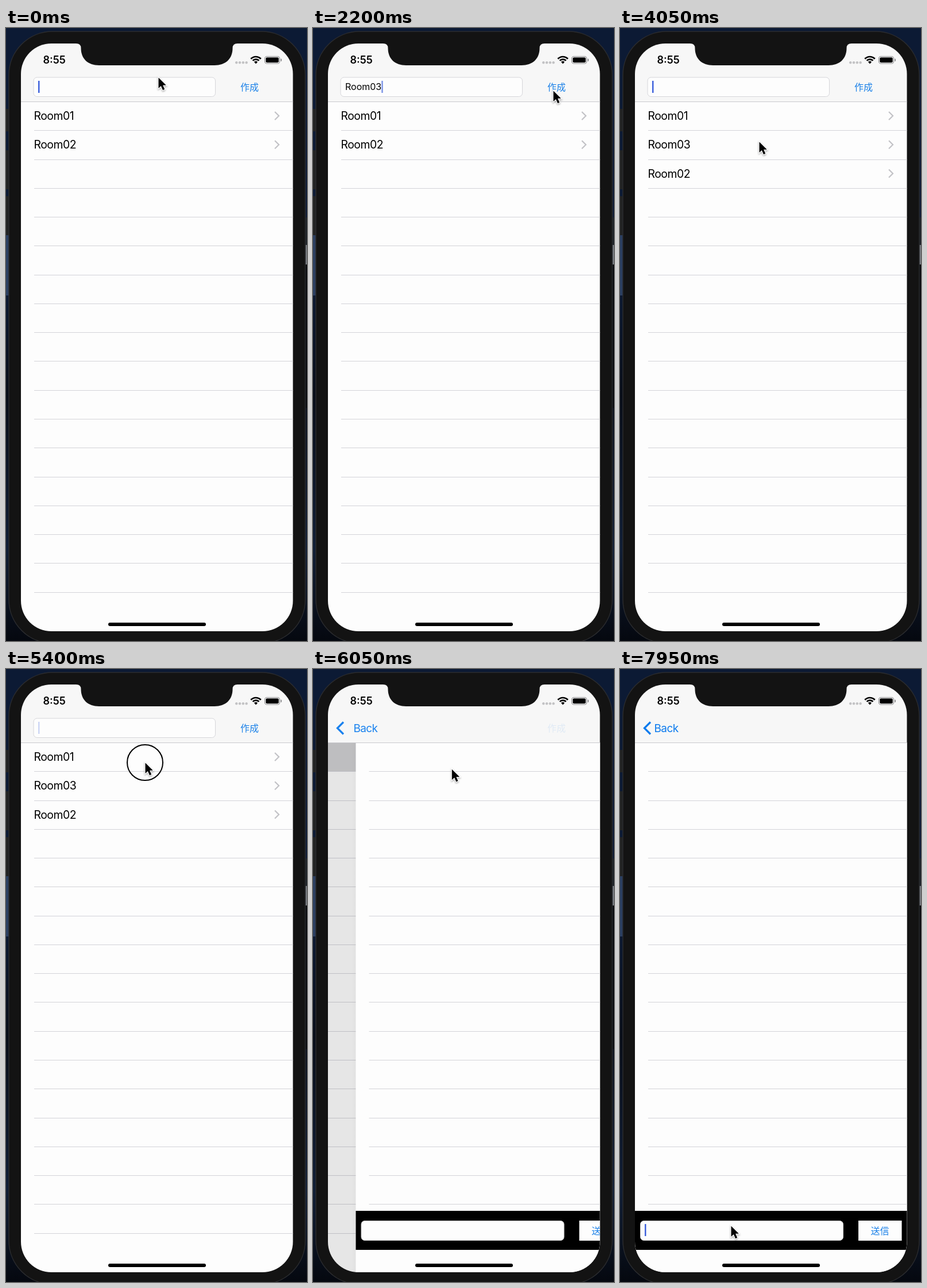
Write an HTML page with a canvas that moves like this. It is 524 px wide and 1068 px high and loops after 8 s.

```html
<!DOCTYPE html>
<html lang="ja">
<head>
<meta charset="utf-8">
<title>Rooms</title>
<style>
html, body { margin: 0; width: 100%; height: 100%; overflow: hidden; background: #0b1528; }
canvas { display: block; width: 524px; height: 1068px; }
</style>
</head>
<body>
<canvas id="stage" width="524" height="1068"></canvas>
<script>
const c = document.getElementById('stage').getContext('2d');
const LOOP = 8000, STEP = 50, ROW = 50.27, TOP = 128;
const LEFT = 26, RIGHT = 499.5, WIDTH = 474;
const PAPER = '#fdfdfd', BLUE = '#1a80e8', LINE = '#d3d3d8';
const LATIN = 'Inter, "Noto Sans", sans-serif';
const CJK = '"Noto Sans CJK JP", "Noto Sans CJK", sans-serif';

const NAME = 'Room03', TYPE_START = 650, TYPE_GAP = 200;
const CREATED = 2600, SELECTED = 5550, PUSH = 5856, FOCUS = 7500;
const CLICKS = [[2400, 2550], [5350, 5500], [7400, 7550]];
// Pointer stops: time, x, y
const PATH = [
  [0, 265, 86], [1500, 265, 86], [2150, 418, 109], [2750, 418, 109],
  [3750, 242, 198], [4500, 242, 198], [5200, 242, 163],
  [5960, 242, 163], [7250, 193, 970], [8000, 193, 970]
];

const clamp = v => Math.max(0, Math.min(1, v));
const smooth = v => v * v * (3 - 2 * v);

function rect(x, y, w, h, color) {
  c.fillStyle = color;
  c.fillRect(x, y, w, h);
}

function round(x, y, w, h, r, fill, stroke, width = 1) {
  c.beginPath();
  c.roundRect(x, y, w, h, r);
  if (fill) { c.fillStyle = fill; c.fill(); }
  if (stroke) { c.strokeStyle = stroke; c.lineWidth = width; c.stroke(); }
}

function poly(points, color, width) {
  c.beginPath();
  points.forEach(([x, y]) => c.lineTo(x, y));
  c.strokeStyle = color;
  c.lineWidth = width;
  c.stroke();
}

function text(s, x, y, font, color = '#000', spacing = 0) {
  c.font = font;
  c.letterSpacing = spacing + 'px';
  c.fillStyle = color;
  c.fillText(s, x, y);
}

function faded(alpha, draw) {
  c.save();
  c.globalAlpha *= clamp(alpha);
  draw();
  c.restore();
}

function backdrop() {
  const g = c.createLinearGradient(0, 0, 0, 1068);
  g.addColorStop(0, '#0c1a34');
  g.addColorStop(0.42, '#0c1a34');
  g.addColorStop(0.6, '#080d18');
  g.addColorStop(0.85, '#101e36');
  g.addColorStop(1, '#05080f');
  rect(0, 0, 524, 1068, g);
  [[141, 39], [213, 68], [293, 68]].forEach(([y, h]) => rect(0, y, 8, h, '#222323'));
  rect(0, 361, 8, 105, '#2b3f61');
  rect(518, 330, 6, 48, '#1b2026');
  rect(518, 378, 6, 34, '#777b80');
  rect(518, 412, 6, 250, '#05070b');
  round(5, 6, 516, 1066, 76, '#131313', '#2b2c2f', 1.5);
}

function separators(x, count) {
  for (let i = 1; i <= count; i++) rect(x, Math.round(TOP + ROW * i), 600, 1, LINE);
}

function roomList(t, p) {
  const shift = -0.3 * WIDTH * p;
  rect(LEFT, TOP, WIDTH, 930, PAPER);
  if (t >= SELECTED) rect(LEFT, TOP, WIDTH, ROW, '#d1d1d3');
  separators(49 + shift, 17);
  const rooms = t < CREATED ? ['Room01', 'Room02'] : ['Room01', NAME, 'Room02'];
  rooms.forEach((room, i) => {
    const y = 153 + ROW * i;
    text(room, 48.5 + shift, y + 7, '19.4px ' + LATIN, '#000', -0.5);
    poly([[468 + shift, y - 7], [475 + shift, y], [468 + shift, y + 7]], '#c3c3c7', 2.2);
  });
  rect(LEFT, TOP, WIDTH, 930, `rgba(0,0,0,${0.1 * p})`);
}

function chat(t, p) {
  const x = LEFT + WIDTH * (1 - p);
  if (p < 0.99) {
    const g = c.createLinearGradient(x - 9, 0, x, 0);
    g.addColorStop(0, 'rgba(0,0,0,0)');
    g.addColorStop(1, `rgba(0,0,0,${0.2 * (1 - p)})`);
    rect(x - 9, TOP, 9, 930, g);
  }
  rect(x, TOP, WIDTH, 930, PAPER);
  separators(x + 23, 16);
  rect(x, 944, WIDTH, 68, '#000');
  round(x + 9.5, 961.5, 353, 34, 6, PAPER, '#d0d0d0');
  rect(x + 389, 961, 75.5, 35, PAPER);
  text('送信', x + 410.5, 985, '16px ' + CJK, BLUE);
  if (t >= FOCUS) caret(44, 967, t - FOCUS);
}

function caret(x, y, age) {
  const k = age % 1000;
  const alpha = k < 750 ? 1 - (k - 500) / 150 : (k - 750) / 200;
  faded(alpha, () => rect(x - 1, y, 2.5, 21, '#3e62dc'));
}

function nav(t, p) {
  rect(LEFT, 27, WIDTH, 101, '#f7f7f7');
  rect(LEFT, TOP, WIDTH, 1, '#c9c9cd');
  const pushing = t >= PUSH;
  const x = pushing ? 121 - 150 * p : 48;
  faded(pushing ? 1 - p * 1.1 : 1, () => {
    round(x, 86, 316.5, 33.5, 6, PAPER, '#d6d6da');
    if (!pushing) {
      const typed = t < CREATED ? clamp((t - TYPE_START) / TYPE_GAP / 6 + 1 / 6) : 0;
      const count = t < TYPE_START ? 0 : Math.floor(typed * 6 + 0.001);
      const word = NAME.slice(0, count);
      text(word, 56, 108, '16px ' + LATIN);
      const last = TYPE_START + TYPE_GAP * (count - 1);
      caret(57 + c.measureText(word).width, 92, t >= CREATED ? t - CREATED : count ? t - last : t);
    }
  });
  faded(1 - p, () => text('作成', 408, 109, '16px ' + CJK, BLUE));
  faded(p * 1.05, () => {
    poly([[53, 92.5], [42.5, 103], [53, 113.5]], '#0d7bee', 3.3);
    text('Back', 59.5 + 107 * (1 - p), 110, '19px ' + LATIN, '#0d7bee', -0.6);
  });
}

function statusBar() {
  text('8:55', 64.5, 62, '600 18px ' + LATIN);
  for (let i = 0; i < 4; i++) round(399 + 5.8 * i, 58, 4.4, 4.4, 2.2, '#c2c2c4');
  c.strokeStyle = '#000';
  [[12, 2.7], [7.4, 2.7]].forEach(([r, w]) => {
    c.beginPath();
    c.arc(435, 62, r, -Math.PI * 0.76, -Math.PI * 0.24);
    c.lineWidth = w;
    c.stroke();
  });
  c.beginPath();
  c.moveTo(435, 62.5);
  c.arc(435, 62, 4.2, -Math.PI * 0.76, -Math.PI * 0.24);
  c.fillStyle = '#000';
  c.fill();
  round(450.5, 49.5, 26, 12.5, 3.6, null, '#8d8d8f', 1.2);
  round(452.3, 51.3, 22.4, 9, 2, '#000');
  round(478.3, 53.5, 1.7, 4.6, 1, '#8d8d8f');
}

function notch() {
  c.beginPath();
  c.moveTo(122, 26);
  c.lineTo(122, 27);
  c.quadraticCurveTo(130.5, 27, 130.5, 35);
  c.bezierCurveTo(130.5, 54, 143, 65, 162, 65);
  c.lineTo(363, 65);
  c.bezierCurveTo(382, 65, 394.5, 54, 394.5, 35);
  c.quadraticCurveTo(394.5, 27, 403, 27);
  c.lineTo(403, 26);
  c.fillStyle = '#131313';
  c.fill();
}

function pointer(t) {
  const i = PATH.findIndex(s => s[0] > t);
  const [t0, x0, y0] = PATH[i - 1], [t1, x1, y1] = PATH[i];
  const k = smooth((t - t0) / (t1 - t0));
  c.save();
  c.translate(x0 + (x1 - x0) * k, y0 + (y1 - y0) * k);
  if (CLICKS.some(([a, b]) => t >= a && t < b)) {
    c.beginPath();
    c.arc(0, 0, 31, 0, 7);
    c.strokeStyle = '#000';
    c.lineWidth = 2;
    c.stroke();
  }
  const arrow = new Path2D('M.5 .5V19L4.8 15 8 22.2 11.2 20.8 8.1 13.7H13.8Z');
  c.shadowColor = 'rgba(0,0,0,.35)';
  c.shadowBlur = 3;
  c.shadowOffsetY = 1.5;
  c.strokeStyle = '#fff';
  c.lineWidth = 2.4;
  c.stroke(arrow);
  c.shadowColor = 'transparent';
  c.fillStyle = '#000';
  c.fill(arrow);
  c.restore();
}

function draw(t) {
  // Critically damped spring drives the push transition
  const s = Math.max(0, t - PUSH) * 0.0199;
  const p = 1 - (1 + s) * Math.exp(-s);
  backdrop();
  c.save();
  c.beginPath();
  c.roundRect(LEFT, 27, RIGHT - LEFT, 1024, 53);
  c.clip();
  roomList(t, p);
  if (p > 0) chat(t, p);
  nav(t, p);
  statusBar();
  round(178, 1036, 170, 6, 3, '#000');
  notch();
  c.restore();
  pointer(t);
}

const start = performance.now();
function tick() {
  const t = (performance.now() - start) % LOOP;
  draw(Math.floor(t / STEP) * STEP);
  requestAnimationFrame(tick);
}
tick();
</script>
</body>
</html>
```
